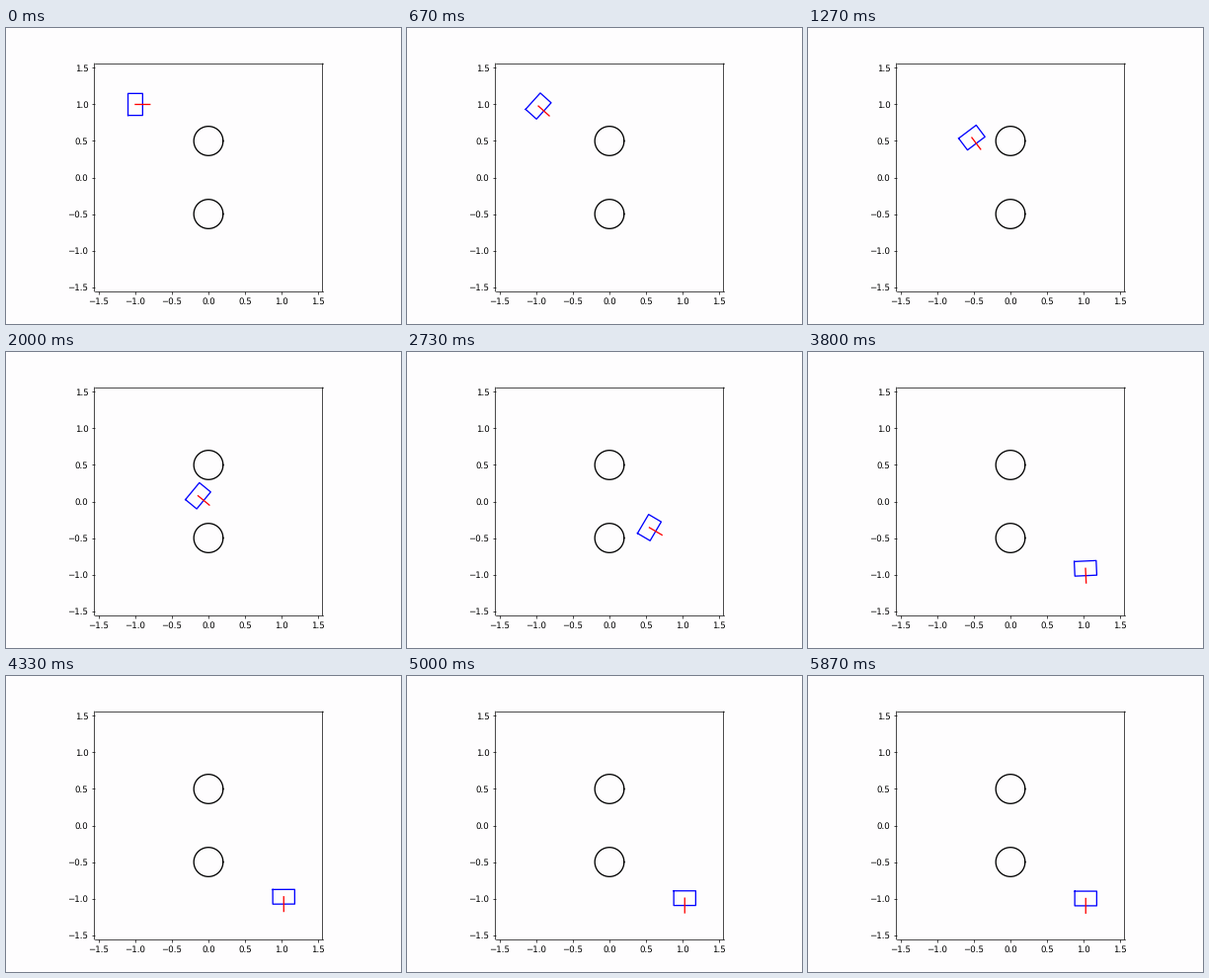
A matplotlib script for the animation above (6270 ms loop, 400 by 300 pixels).

```python
import numpy as np
import matplotlib.pyplot as plt
from matplotlib.animation import FuncAnimation

LOOP, TICK = 6270, 30      # ms
STEP = 200 / 3             # ms per simulation step
LIMIT = 1.56

# waypoints: step, x, y, heading (deg), speed per step
ROUTE = np.array([
    (0, -1.0, 1.0, 0, 0),
    (10, -0.972, 0.978, -42, 0.01),
    (19, -0.528, 0.546, -53, 0.047),
    (30, -0.142, 0.078, -39.5, 0.05),
    (41, 0.546, -0.357, -30.5, 0.111),
    (50, 0.978, -0.746, -66, 0.043),
])
GOAL = np.array([1.03, -1.0, -90])
SETTLE = np.array([0.4, 0.157, 0.32])    # decay rates towards the goal

steps, poses = ROUTE[:, 0], ROUTE[:, 1:4]
turn = np.radians(ROUTE[:, 3])
# the robot only ever drives along its heading
rates = np.column_stack([ROUTE[:, 4] * np.cos(turn),
                         ROUTE[:, 4] * np.sin(turn),
                         np.gradient(ROUTE[:, 3], steps)])

# robot outline and heading mark, facing +x
BODY = np.array([(-.1, -.15), (.1, -.15), (.1, .15), (-.1, .15), (-.1, -.15)])
NOSE = np.array([(0, 0), (.2, 0)])


def pose(step):
    """Hermite curve along the route, then exponential settling."""
    if step >= steps[-1]:
        return GOAL + (poses[-1] - GOAL) * np.exp(-SETTLE * (step - steps[-1]))
    i = np.searchsorted(steps, step, side="right") - 1
    h = steps[i + 1] - steps[i]
    u = (step - steps[i]) / h
    ease = u * u * (3 - 2 * u)
    return (poses[i] * (1 - ease) + poses[i + 1] * ease
            + h * u * (1 - u) * ((1 - u) * rates[i] - u * rates[i + 1]))


def place(shape, x, y, heading):
    c, s = np.cos(np.radians(heading)), np.sin(np.radians(heading))
    return (shape @ np.array([(c, s), (-s, c)]) + (x, y)).T


plt.rcParams["text.hinting"] = "none"
paper = "#fefdfe"
fig, ax = plt.subplots(figsize=(6.4, 4.8), dpi=62.5, facecolor=paper)
ax.set_facecolor(paper)
ax.set_aspect("equal")
ax.set(xlim=(-LIMIT, LIMIT), ylim=(-LIMIT, LIMIT))
ticks = np.arange(-1.5, 1.6, 0.5)
ax.set_xticks(ticks)
ax.set_yticks(ticks)
for side in ("left", "right"):
    ax.spines[side].set_snap(False)

angle = np.linspace(0, 2 * np.pi, 100)
for cy in (0.5, -0.5):
    ax.plot(0.2 * np.cos(angle), cy + 0.2 * np.sin(angle), "k")

body, = ax.plot([], [], "b", snap=False)
nose, = ax.plot([], [], "r", snap=False)


def update(i):
    now = pose(int((i * TICK + 24) / STEP))
    body.set_data(*place(BODY, *now))
    nose.set_data(*place(NOSE, *now))
    return body, nose


anim = FuncAnimation(fig, update, frames=LOOP // TICK, interval=TICK,
                     repeat=True, repeat_delay=0, blit=False)
plt.show()
```
